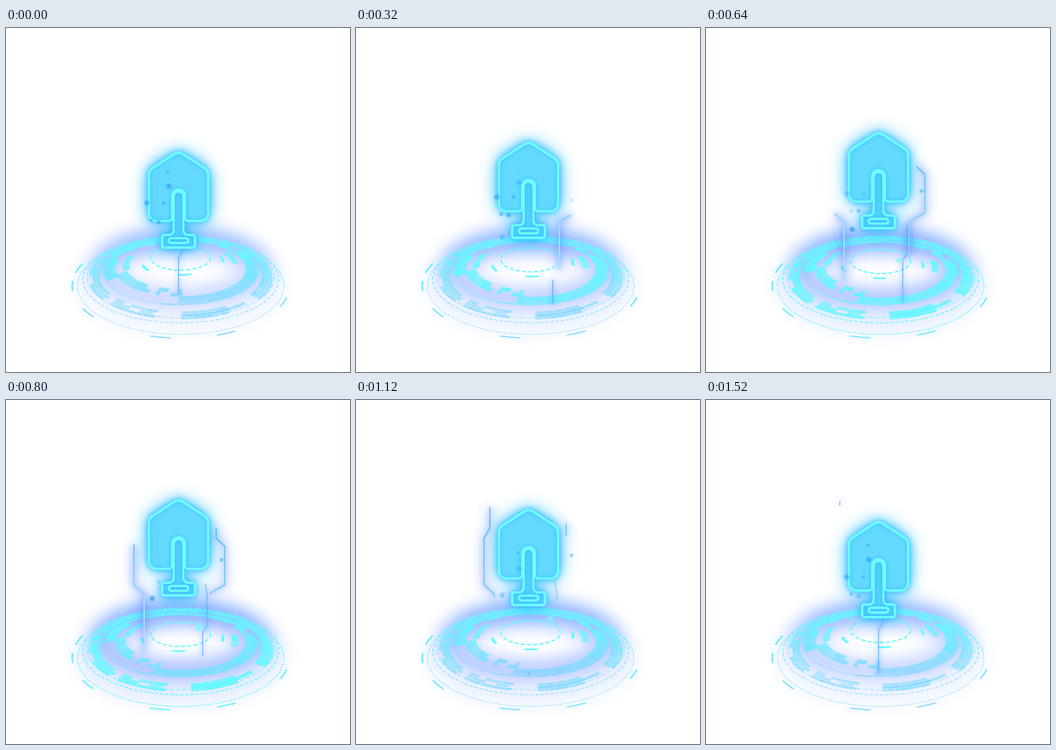
An HTML page with a canvas that plays this animation: 640x640 px, repeating every 1.6 s.

```html
<!DOCTYPE html>
<html>
<head>
<meta charset="utf-8">
<style>
html, body { margin: 0; height: 100%; overflow: hidden; background: #fff; }
canvas { display: block; }
</style>
</head>
<body>
<canvas id="stage" width="640" height="640"></canvas>
<script>
const ctx = document.getElementById('stage').getContext('2d');
const LOOP = 1600, STEP = 80, CX = 325, RAD = Math.PI / 180;
let seed, lift;

const random = () => (seed = seed * 16807 % 2147483647) / 2147483647;
const mix = (a, b, k) => a + (b - a) * k;
const clamp = x => Math.min(1, Math.max(0, x));
const easeOut = x => 1 - (1 - clamp(x)) ** 3;
const smooth = x => (x = clamp(x)) * x * (3 - 2 * x);
const pulse = (t, peak, width) => Math.exp(-(((t - peak) / width) ** 2));

// Perspective of the two disc layers: how centre and height grow with the radius
const OUTER = { drop: .3, squash: .445 }, INNER = { drop: .27, squash: .42 };

function fade(top, bottom, y0, y1) {
  const g = ctx.createLinearGradient(0, y0, 0, y1);
  g.addColorStop(0, top);
  g.addColorStop(1, bottom);
  return g;
}

function ringPaint(b) {
  const low = `rgba(${mix(105, 95, b)},${mix(212, 252, b)},255,${mix(.55, .95, b)})`;
  return fade('rgba(95,253,255,.97)', low, 420, 510);
}

function ellipse(cy, rx, ry) {
  ctx.beginPath();
  ctx.ellipse(CX, cy, rx, ry, 0, 0, Math.PI * 2);
}

function block(layer, r0, r1, a0, a1) {
  const arc = (r, from, to, back) => {
    const sink = 8 * lift * clamp((156 - r) / 90);
    ctx.ellipse(CX, 415 + layer.drop * r + sink, r, layer.squash * r, 0, from * RAD, to * RAD, back);
  };
  ctx.beginPath();
  arc(r1, a0, a1, false);
  arc(r0, a1, a0, true);
  ctx.fill();
}

// A band of random bricks laid in lanes
function bricks(layer, r0, r1, a0, a1, lane, gap) {
  for (let r = r0; r < r1 - 1; r += lane) {
    for (let a = a0 - random() * 4; a < a1;) {
      const w = 4 + random() * 10;
      ctx.globalAlpha = .7 + .3 * random();
      if (random() > .1) block(layer, r, Math.min(r + lane, r1) - gap, a, Math.min(a + w, a1 + 2) - gap * .4);
      a += w;
    }
  }
  ctx.globalAlpha = 1;
}

function dashedRing(cy, rx, ry, dash, width, offset = 0) {
  ctx.setLineDash(dash);
  ctx.lineDashOffset = offset;
  ctx.lineWidth = width;
  ellipse(cy, rx, ry);
  ctx.stroke();
  ctx.setLineDash([]);
}

function drawHalo() {
  const blurRing = (cy, rx, ry, width, paint) => {
    ctx.lineWidth = width;
    ctx.strokeStyle = paint;
    ellipse(cy, rx, ry);
    ctx.stroke();
  };
  ctx.save();
  ctx.filter = 'blur(16px)';
  blurRing(450, 150, 59, 36, fade(`rgba(70,135,255,${.6 + .1 * lift})`, `rgba(100,140,255,${.26 + .2 * lift})`, 390, 515));
  blurRing(453, 118, 44, 24, `rgba(100,140,255,${.2 + .12 * lift})`);
  blurRing(475, 180, 78, 28, `rgba(120,165,255,${.13 + .1 * lift})`);
  ctx.fillStyle = `rgba(90,190,255,${.3 * lift})`;
  ctx.fillRect(285, 350, 70, 40);
  ctx.restore();
}

function drawRings(t) {
  seed = 4217;
  const far = pulse(t, 730, 230), near = pulse(t, 500, 320), rim = pulse(t, 870, 260);

  ctx.strokeStyle = ctx.fillStyle = ringPaint(far);
  dashedRing(480, 192, 90, [3.5, 2], 1.7);
  dashedRing(468, 182, 80.5, [6, 3.5], 2);
  dashedRing(464, 174, 75, [8, 4], 1.4);
  const outer = (r0, r1, a0, a1) => bricks(OUTER, r0, r1, a0 - 7 * lift, a1 - 7 * lift, 7, .8 * (1 - far));
  outer(151, 172, 150, 390);
  for (const middle of [73, 124]) outer(151, 172, middle - 15, middle + 15);
  outer(158, 165, 32, 109);

  ctx.strokeStyle = ctx.fillStyle = ringPaint(near);
  ctx.lineWidth = 1;
  ellipse(454, 145, 61);
  ctx.stroke();
  const inner = (r0, r1, a0, a1) => bricks(INNER, r0, r1, a0 + 21 * lift, a1 + 21 * lift, 11, 0);
  inner(121, 144, 165, 375);
  inner(122, 145, 15, 91);
  inner(102, 123, 92, 166);
  inner(95, 108, 172, 204);
  inner(95, 108, 328, 352);
  block(INNER, 143, 146, 94 + 21 * lift, 106 + 21 * lift);

  ctx.strokeStyle = ctx.fillStyle = ringPaint(.9);
  dashedRing(428 + 8 * lift, 55.5, 22.5, [7.5, 4], 2.4, -10 * lift);
  for (const [r, a] of [[62, 72], [70, 146], [76, 338]]) block(INNER, r, r + r / 14, a + 11 * lift, a + 22 + 11 * lift);

  ctx.strokeStyle = fade('rgb(92,240,255)', `rgba(${mix(130, 92, rim)},${mix(220, 246, rim)},255,.9)`, 450, 560);
  ctx.lineWidth = 2.6;
  for (const a of [18, 65, 101, 149, 180, 200]) {
    ctx.beginPath();
    ctx.ellipse(CX, 480, 202, 97, 0, (a - 5.5) * RAD, (a + 5.5) * RAD);
    ctx.stroke();
  }
}

// Every trace runs the same trimmed stroke, only at its own delay
const traces = [
  { delay: -20, core: 1, points: [[378, 450], [378, 360], [407, 344], [407, 272], [391, 257], [391, 230]] },
  { delay: 310, core: 1, points: [[257, 470], [257, 361], [238, 344], [238, 258], [249, 238], [249, 188]] },
  { delay: 80, core: .15, points: [[366, 515], [366, 432], [374, 420], [374, 360], [370, 340], [370, 328]] },
  { delay: 960, core: .15, points: [[321, 512], [321, 428], [330, 412], [330, 332]] }
];

function drawTrace({ delay, core, points }, t) {
  const age = (t - delay + LOOP) % LOOP;
  const out = easeOut((age - 150) / 1000), gone = smooth((age - 490) / 800);
  if (out <= gone) return;
  const length = points.slice(1).reduce((sum, [x, y], i) => sum + Math.hypot(x - points[i][0], y - points[i][1]), 0);
  const stroke = (width, color, blur) => {
    ctx.lineWidth = width;
    ctx.strokeStyle = color;
    ctx.shadowBlur = blur;
    ctx.stroke();
  };
  ctx.save();
  ctx.beginPath();
  points.forEach(p => ctx.lineTo(...p));
  ctx.setLineDash([(out - gone) * length, 999]);
  ctx.lineDashOffset = -gone * length;
  ctx.shadowColor = 'rgb(45,105,255)';
  ctx.globalAlpha = 1 - .6 * gone;
  stroke(2, 'rgba(85,170,255,.8)', 12);
  if (core === 1) {
    stroke(2.2, 'rgb(95,185,255)', 26);
    stroke(2.2, 'rgb(95,185,255)', 20);
  }
  const white = `rgba(225,255,255,${core * (1 - gone)})`;
  stroke(1.3, fade('rgba(160,225,255,.3)', white, 260, 380), 0);
  ctx.restore();
}

// Closed polygon from [x, y, corner radius]
function rounded(corners) {
  const path = new Path2D(), [first] = corners, last = corners[corners.length - 1];
  path.moveTo((first[0] + last[0]) / 2, (first[1] + last[1]) / 2);
  corners.forEach(([x, y, r], i) => {
    const next = corners[(i + 1) % corners.length];
    path.arcTo(x, y, next[0], next[1], r);
  });
  path.closePath();
  return path;
}

// Right half of a shape plus its reflection in the icon's axis
function mirrored(half) {
  return rounded([...half, ...half.map(([x, y, r]) => [642 - x, y, r]).reverse()]);
}

const head = rounded([
  [321, 229, 16], [376, 265, 16], [376, 359, 14], [333, 359, 6], [333, 300.5, 11.9],
  [309, 300.5, 11.9], [309, 359, 6], [266, 359, 14], [266, 265, 16]
]);
const handle = mirrored([[330, 304, 8.9], [330, 385, 9], [351.5, 385, 4], [351.5, 408.5, 4]]);
const slot = new Path2D();
slot.roundRect(303, 391, 36, 9, 4.5);

function drawIcon() {
  ctx.save();
  ctx.translate(0, -45 * lift);
  ctx.shadowColor = 'rgb(45,190,255)';
  ctx.fillStyle = '#64d9ff';
  for (const blur of [38, 20, 0]) {
    ctx.shadowBlur = blur;
    ctx.fill(head);
    ctx.fill(handle);
  }
  ctx.fillStyle = '#56d0ff';
  ctx.fill(handle);
  ctx.strokeStyle = '#6dfdff';
  ctx.lineWidth = 4;
  ctx.shadowColor = 'rgba(35,180,255,.8)';
  for (const blur of [8, 0]) {
    ctx.shadowBlur = blur;
    for (const shape of [head, handle, slot]) ctx.stroke(shape);
  }
  ctx.restore();
}

// Dots as [x, y, radius, birth]; all rise and fade alike
const particles = [
  [303, 328, 5, 900], [301, 306, 2.5, 740], [293, 350, 3, 1160], [262, 350, 5, 1160],
  [270, 382, 3, 1160], [284, 380, 4, 1280], [272, 404, 5, 80], [401, 328, 3, 200]
];
const sparks = [[358, 440, 5, 480], [362, 424, 5, 700], [272, 412, 4, 1400]];

function drawDots(dots, color, strength, life, rise, t) {
  ctx.fillStyle = ctx.shadowColor = color;
  ctx.shadowBlur = 4;
  for (const [x, y, r, birth] of dots) {
    const p = (t - birth + LOOP) % LOOP / life;
    if (p >= 1) continue;
    ctx.globalAlpha = strength * Math.sin(Math.PI * p);
    ctx.beginPath();
    ctx.arc(x, y - rise * p * (2 - p), r * .9, 0, Math.PI * 2);
    ctx.fill();
  }
  ctx.globalAlpha = 1;
  ctx.shadowBlur = 0;
}

const start = performance.now();
function frame() {
  const t = Math.floor((performance.now() - start) % LOOP / STEP) * STEP;
  lift = 1 - Math.abs(t - LOOP / 2) / (LOOP / 2);
  ctx.clearRect(0, 0, 640, 640);
  drawHalo();
  drawRings(t);
  traces.forEach(trace => drawTrace(trace, t));
  drawDots(sparks, 'rgb(120,250,255)', .8, 700, 20, t);
  drawIcon();
  drawDots(particles, 'rgb(40,160,250)', .5, 1250, 42, t);
  requestAnimationFrame(frame);
}
frame();
</script>
</body>
</html>
```
